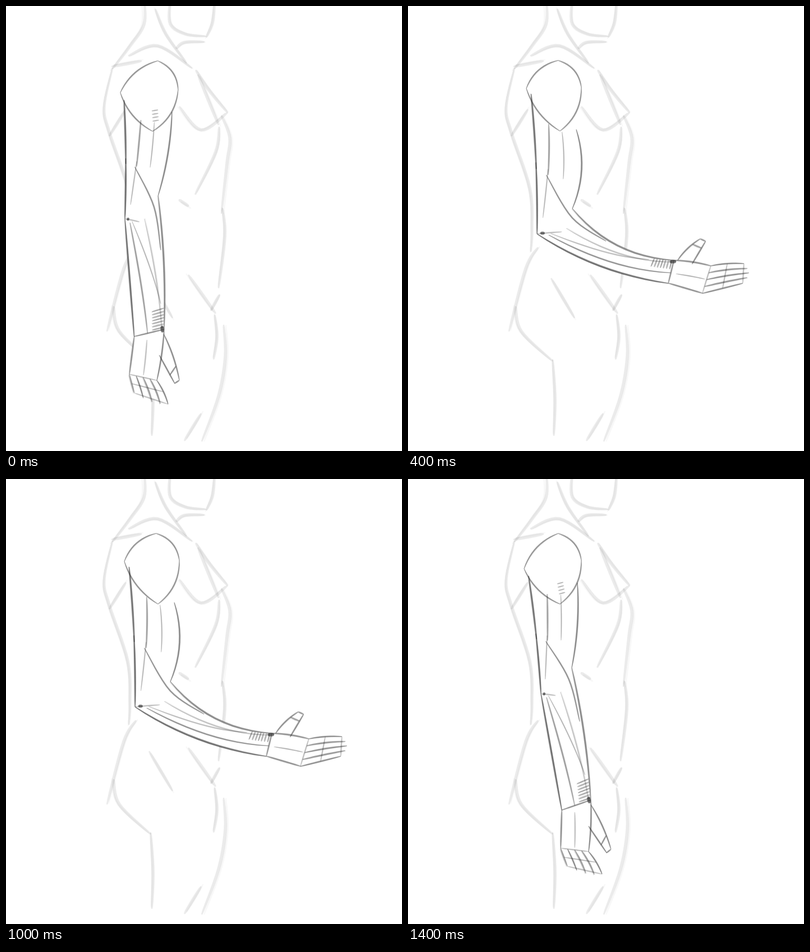
An HTML page with a canvas that plays this animation: 706 by 793 pixels, repeating every 1.5 s.

```html
<!DOCTYPE html>
<html>
<head>
<meta charset="utf-8">
<style>
html, body { margin: 0; width: 100%; height: 100%; overflow: hidden; background: #fff }
canvas { display: block }
</style>
</head>
<body>
<canvas id="stage" width="706" height="793"></canvas>
<script>
const ctx = document.getElementById('stage').getContext('2d');

// Landmarks of the arm; the last values are how far each edge bows outwards
const poses = [
  { back: [207, 160], biceps: [302, 185], elbow: [237, 383], crook: [292, 336],
    wristBack: [274, 590], wristFront: [326, 572], knuckleBack: [272, 658], knuckleFront: [322, 664],
    tipBack: [284, 690], tipFront: [346, 704], thumb: [358, 663],
    triceps: 2, bulge: 5, belly: 0, hollow: 5, shade: .3 },
  { back: [204, 151], biceps: [304, 210], elbow: [236, 398], crook: [297, 356],
    wristBack: [414, 573], wristFront: [438, 540], knuckleBack: [457, 614], knuckleFront: [490, 549],
    tipBack: [485, 618], tipFront: [507, 571], thumb: [520, 582],
    triceps: 6, bulge: 13, belly: -2, hollow: -11, shade: .35 },
  { back: [211, 147], biceps: [300, 220], elbow: [230, 406], crook: [293, 361],
    wristBack: [464, 494], wristFront: [474, 453], knuckleBack: [525, 512], knuckleFront: [540, 463],
    tipBack: [597, 494], tipFront: [599, 459], thumb: [526, 417],
    triceps: 3, bulge: 13, belly: -14, hollow: -22, shade: 0 },
  { back: [218, 157], biceps: [303, 204], elbow: [227, 410], crook: [301, 357],
    wristBack: [485, 433], wristFront: [482, 391], knuckleBack: [577, 367], knuckleFront: [550, 355],
    tipBack: [577, 335], tipFront: [537, 318], thumb: [502, 330],
    triceps: -9, bulge: 15, belly: -5, hollow: -18, shade: 0 }
];

let seed;
const random = () => (seed = seed * 16807 % 2147483647) / 2147483647;
const jitter = size => (random() - .5) * size;

const mix = (a, b, t) => a + (b - a) * t;
const mixPoint = (a, b, t) => [mix(a[0], b[0], t), mix(a[1], b[1], t)];
const range = n => Array.from({ length: n + 1 }, (_, i) => i / n);

function mixPose(a, b, t) {
  const pose = {};
  for (const key in a) pose[key] = (a[key].length ? mixPoint : mix)(a[key], b[key], t);
  return pose;
}

// Point at t on a bowed line; a positive sag bends it to the left of its direction
function bow(a, b, sag, t) {
  const dx = b[0] - a[0], dy = b[1] - a[1], k = sag * 4 * t * (1 - t) / Math.hypot(dx, dy);
  return [a[0] + dx * t + dy * k, a[1] + dy * t - dx * k];
}
const arc = (a, b, sag) => range(12).map(t => bow(a, b, sag, t));

// Surface between two bowed edges: u runs along the limb, v from its back to its front
const limb = (b1, b2, backSag, f1, f2, frontSag) => (u, v) =>
  mixPoint(bow(b1, b2, backSag, u), bow(f1, f2, frontSag, u), v);
const trace = (part, u1, v1, u2, v2) => range(12).map(t => part(mix(u1, u2, t), mix(v1, v2, t)));

function spline(p) {
  const at = i => p[Math.max(0, Math.min(p.length - 1, i))];
  const curve = (a, b, c, d, t) =>
    b + t / 2 * (c - a + t * (2 * a - 5 * b + 4 * c - d + t * (3 * (b - c) + d - a)));
  return p.slice(1).flatMap((_, i) => range(8).slice(i ? 1 : 0).map(t =>
    [0, 1].map(k => curve(at(i - 1)[k], at(i)[k], at(i + 1)[k], at(i + 2)[k], t))));
}

function fill(points, colour) {
  ctx.fillStyle = colour;
  ctx.beginPath();
  points.forEach(([x, y]) => ctx.lineTo(x, y));
  ctx.fill();
}
const mask = points => fill(points, '#fff');
const maskLimb = part => mask([...trace(part, 0, 0, 1, 0), ...trace(part, 1, 1, 0, 1)]);

function taper(points, width, alpha) {
  const left = [], right = [], last = points.length - 1;
  points.forEach(([x, y], i) => {
    const a = points[Math.max(0, i - 1)], b = points[Math.min(last, i + 1)];
    const dx = b[0] - a[0], dy = b[1] - a[1];
    const r = width / 2 * (.4 + .6 * Math.sqrt(Math.abs(Math.sin(Math.PI * i / last)))) / (Math.hypot(dx, dy) || 1);
    left.push([x - dy * r, y + dx * r]);
    right.unshift([x + dy * r, y - dx * r]);
  });
  fill([...left, ...right], `rgba(40,40,40,${alpha})`);
}

// Soft pencil line, restated once with a small offset
function pencil(points, width = 2.2, alpha = .45, loose = 3) {
  const ox = jitter(loose), oy = jitter(loose);
  taper(points, width + 1.2, alpha * .35);
  taper(points, width, alpha * .7);
  taper(points.map(([x, y]) => [x + ox, y + oy]), width * .7, alpha * .35);
}
const light = points => pencil(points, 1.6, .3);
const bold = points => pencil(points, 2.8, .65);

function soft(...xy) {
  const points = [];
  for (let i = 0; i < xy.length; i += 2) points.push([xy[i], xy[i + 1]]);
  pencil(spline(points), 5.5, .085, 9);
}

function body() {
  // head, neck and collar
  soft(247, -8, 246, 33, 222, 70, 190, 112);
  soft(266, 5, 285, 50, 322, 102);
  soft(292, -8, 293, 32, 320, 50, 356, 54);
  soft(372, -6, 368, 30, 357, 56);
  soft(303, 76, 318, 65, 354, 64);
  soft(218, 89, 270, 71, 332, 111);
  soft(188, 108, 242, 98);
  // back
  soft(190, 110, 175, 180, 184, 225, 217, 325, 221, 400, 219, 438);
  soft(214, 184, 184, 232);
  // chest and belly
  soft(338, 114, 362, 150, 395, 190);
  soft(342, 122, 379, 212);
  soft(395, 190, 348, 221, 309, 179);
  soft(384, 195, 399, 235, 394, 280, 384, 370);
  soft(380, 215, 374, 260, 337, 336);
  soft(308, 345, 326, 357);
  soft(386, 360, 390, 410, 379, 503);
  // hips and legs
  soft(232, 430, 210, 468, 180, 580);
  soft(192, 535, 202, 580, 258, 633);
  soft(258, 630, 262, 700, 260, 766);
  soft(388, 568, 391, 625, 379, 695, 349, 776);
  soft(255, 485, 297, 556);
  soft(325, 479, 374, 548);
  soft(381, 514, 365, 543);
  soft(372, 550, 376, 590, 370, 630);
  soft(348, 726, 318, 775);
}

function arm(p) {
  const cap = [268, 97], front = [309, 145], notch = [271, 223];
  const shoulder = [[p.back, cap, 10], [cap, front, 10], [front, notch, 11], [notch, p.back, 9]].map(s => arc(...s));
  const upper = limb([p.back[0] + 10, p.back[1] + 28], p.elbow, p.triceps, p.biceps, p.crook, p.bulge);
  const fore = limb(p.elbow, p.wristBack, p.belly, p.crook, p.wristFront, p.hollow);
  const palm = limb(p.wristBack, p.knuckleBack, 0, p.wristFront, p.knuckleFront, 2);
  const fingers = limb(p.knuckleBack, p.tipBack, 0, p.knuckleFront, p.tipFront, 2);
  const thumbBack = palm(.5, .92), thumbFront = palm(.1, 1);
  const tip = side => {
    const dx = p.thumb[0] - thumbBack[0], dy = p.thumb[1] - thumbBack[1], k = 5 * side / Math.hypot(dx, dy);
    return [p.thumb[0] + dy * k, p.thumb[1] - dx * k];
  };
  const thumb = limb(thumbBack, tip(-1), 0, thumbFront, tip(1), 3);

  [upper, fore, palm, fingers, thumb].forEach(maskLimb);
  mask(shoulder.flat());

  shoulder.forEach(s => pencil(s));
  for (let i = 0; i < 4; i++) pencil(arc([266 + i, 187 + 6 * i], [277 + i, 184 + 6 * i], 0), 1.6, p.shade);

  // upper arm
  bold(trace(upper, -.08, 0, .5, 0));
  bold(trace(upper, .45, 0, 1, 0));
  pencil(trace(upper, 0, 1, 1, 1), 2.5, .5);
  pencil(trace(upper, .1, .34, .55, .26));
  light(trace(upper, .5, .26, .9, .15));
  light(trace(upper, .12, .63, .6, .6));
  pencil(spline([upper(.55, .22), fore(.06, .85), fore(.4, .93)]));

  // forearm
  bold(trace(fore, 0, 0, 1, 0));
  pencil(trace(fore, 0, 1, 1, 1), 2.5, .55);
  pencil(trace(fore, .06, .14, 1, .45));
  light(trace(fore, .06, .2, .8, .88));
  light(trace(fore, .1, .55, 1, .92));
  light(trace(fore, 0, 0, .1, .4));
  pencil(trace(fore, .01, .06, .03, .12), 5, .6);
  for (let i = 0; i < 7; i++) pencil(trace(fore, .84 + i * .024, .98, .84 + i * .024, .6), 1.8, .4);
  pencil(trace(fore, 1, 0, 1, 1));
  pencil(trace(fore, .97, .92, 1.02, .95), 6, .65);

  // hand
  [0, 1].forEach(v => pencil(trace(palm, 0, v, 1, v), 2.3, .5));
  light(trace(palm, .15, .45, .95, .5));
  range(4).forEach(v => pencil(trace(fingers, 0, v, 1 + .15 * Math.sin(Math.PI * v), v), 2.2, .5));
  [0, .5, 1].forEach(u => light(trace(fingers, u, 0, u, 1)));
  [0, 1].forEach(v => pencil(trace(thumb, 0, v, 1, v), 2.2, .5));
  [.7, 1].forEach(u => pencil(trace(thumb, u, 0, u, 1)));
}

const STEPS = 15, HOLD = 100;
let shown = -1;

function draw(step) {
  // up and back down, with a small overshoot at the top
  const level = Math.min(step / 2, (STEPS - 1 - step) / 2, 3.2);
  const key = Math.min(Math.floor(level), 2);
  seed = 7;
  ctx.clearRect(0, 0, 706, 793);
  body();
  ctx.save();
  if (step === 0) {
    // the arm swings back once before it lifts
    ctx.translate(262, 125);
    ctx.rotate(.098);
    ctx.translate(-262, -125);
  }
  arm(mixPose(poses[key], poses[key + 1], level - key));
  ctx.restore();
}

const start = performance.now();
function tick() {
  const step = Math.floor((performance.now() - start) / HOLD) % STEPS;
  if (step !== shown) draw(shown = step);
  requestAnimationFrame(tick);
}
tick();
</script>
</body>
</html>
```
